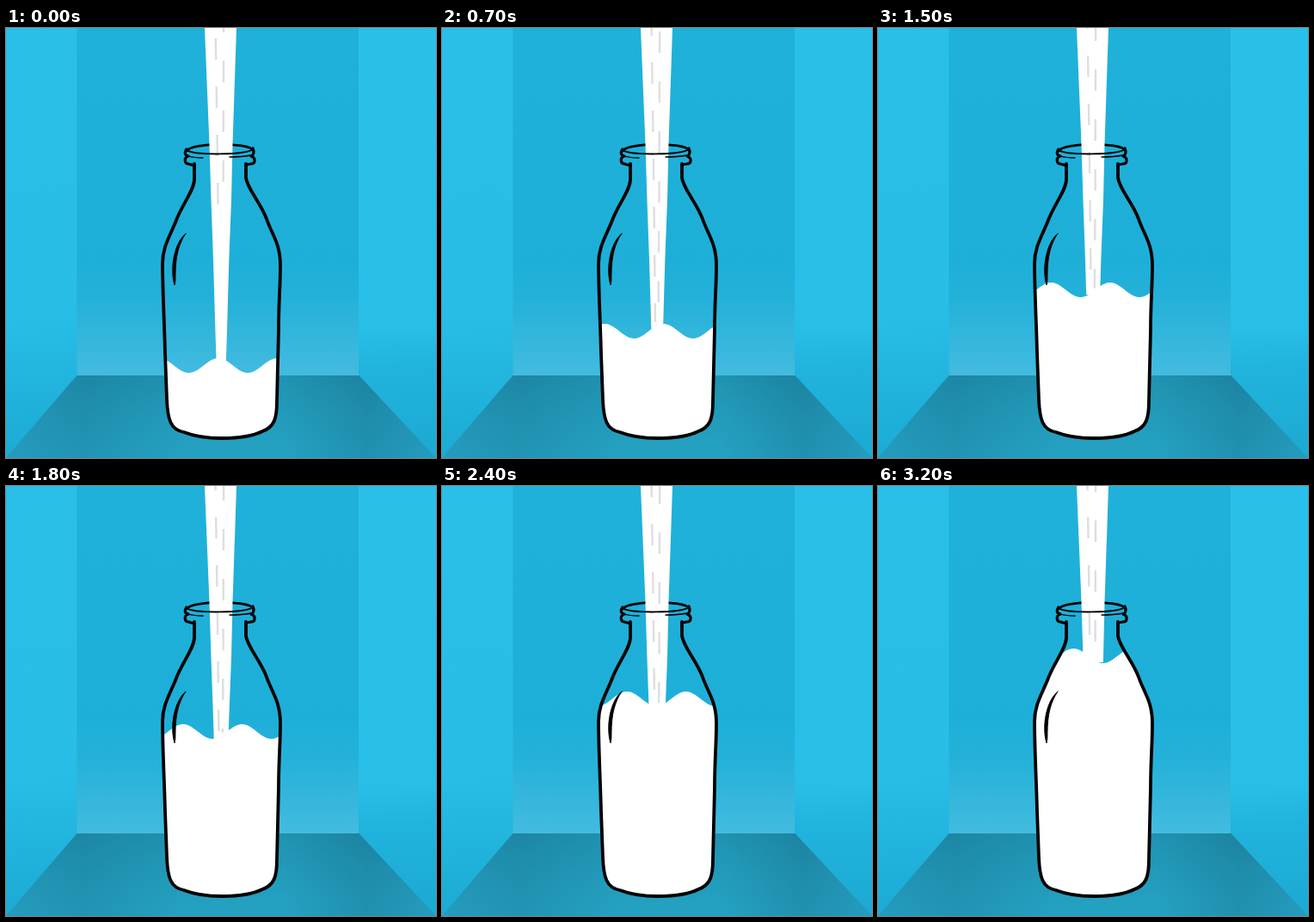
Write an HTML page with a canvas that moves like this. It is 500x500 px and loops after 3300 ms.

```html
<!DOCTYPE html>
<html>
<head>
<meta charset="utf-8">
<style>
html, body { margin: 0; width: 100%; height: 100%; overflow: hidden; background: #1fb1d9; }
canvas { display: block; width: 500px; height: 500px; }
</style>
</head>
<body>
<canvas id="stage" width="500" height="500"></canvas>
<script>
const ctx = document.getElementById('stage').getContext('2d');
const STEP = 100, STEPS = 33;

const BODY = new Path2D('M219 158 L219 176 C219 189 204 206 197 226 C190 243 182 255 182 274 ' +
  'C182 302 184 340 185 378 L187 432 C188 455 191 467 207 470 C222 476 237 477 251 477 ' +
  'C270 477 288 474 298 469 C312 464 315 454 315 434 L317 350 C317 320 319 300 319 276 ' +
  'C319 250 309 240 303 222 C296 203 280 186 279 174 L279 158');
const BACK_RIM = new Path2D('M210 143 C215 133 283 133 287 142');
const FRONT_RIM = new Path2D('M210 142 C218 148 278 148 287 141');
const LIP = new Path2D('M210 141 C207 145 208 148 212 149 C206 151 208 158 212 158 L219 160 ' +
  'M287 140 C289 144 288 148 285 149 C291 151 290 158 285 158 L279 159');
const LIP_LINES = new Path2D('M212 149 Q219 151 229 151 M285 148 Q274 150 260 150');
const SHINE = new Path2D('M209 239 C196 249 190 279 196 299 C197 296 197 292 197 288 C197 265 201 251 209 239 Z');

// Piecewise linear curve through [x, y] points
function curve(points, x) {
  let i = 1;
  while (i < points.length - 1 && x > points[i][0]) i++;
  const [x0, y0] = points[i - 1], [x1, y1] = points[i];
  return y0 + (y1 - y0) * (x - x0) / (x1 - x0);
}

const RISE = [[0, 0], [7, 40], [12, 69], [15, 88], [21, 126], [27, 164], [32, 195]];
const LEFT = [[0, 231], [135, 236.5], [200, 238.5], [270, 241], [345, 243.2], [400, 245]];
const RIGHT = [[0, 268], [135, 263.5], [200, 262], [270, 259.3], [345, 257.2], [400, 255.5]];

function gradient(x0, y0, x1, y1, stops) {
  const g = ctx.createLinearGradient(x0, y0, x1, y1);
  for (const [at, color] of stops) g.addColorStop(at, color);
  return g;
}

function polygon(points, fill) {
  ctx.beginPath();
  for (const [x, y] of points) ctx.lineTo(x, y);
  ctx.closePath();
  ctx.fillStyle = fill;
  ctx.fill();
}

function drawRoom() {
  polygon([[0, 0], [500, 0], [500, 410], [0, 410]],
    gradient(0, 0, 0, 404, [[0, '#1fb1d9'], [0.67, '#1eafd8'], [0.78, '#24b1d9'], [1, '#43bbdf']]));
  polygon([[0, 0], [82.5, 0], [82.5, 404], [0, 500]],
    gradient(0, 0, 25, 500, [[0, '#2abfe8'], [0.68, '#27bde6'], [1, '#1baad4']]));
  polygon([[410, 0], [500, 0], [500, 500], [410, 404]],
    gradient(440, 0, 465, 500, [[0, '#29bfe8'], [0.7, '#27bee7'], [0.78, '#21b4de'], [1, '#1ca9d3']]));
  const floor = [[82.5, 404], [410.5, 404], [500, 500], [0, 500]];
  polygon(floor, gradient(0, 0, 500, 0,
    [[0, '#2499bb'], [0.18, '#2090b0'], [0.42, '#249fbf'], [0.65, '#249fbf'], [0.84, '#1f8cab'], [1, '#2499bb']]));
  polygon(floor, gradient(0, 404, 0, 500, [[0, 'rgba(16,100,125,.22)'], [1, 'rgba(40,175,210,.14)']]));
}

function surface(x, n) {
  const crest = 246.8 + 1.53 * n;
  return 392.5 - curve(RISE, n) - 8.5 * Math.cos((x - crest) * Math.PI * 2 / 68.5);
}

function drawMilk(n) {
  ctx.save();
  ctx.clip(BODY);
  ctx.beginPath();
  ctx.moveTo(175, 485);
  for (let x = 175; x <= 325; x++) ctx.lineTo(x, surface(x, n));
  ctx.lineTo(325, 485);
  ctx.fillStyle = '#fff';
  ctx.fill();
  ctx.restore();
}

function drawStream(n) {
  const end = surface(250, n) + 6;
  const sides = [];
  for (let y = 0; y <= end; y += 5) {
    sides.unshift([curve(LEFT, y), y]);
    sides.push([curve(RIGHT, y), y]);
  }
  polygon(sides, '#fff');
  drawDashes(n, Math.min(end - 10, 206 + n * 20));
}

function drawDashes(n, end) {
  ctx.strokeStyle = '#dedede';
  ctx.lineWidth = 2.4;
  ctx.lineCap = 'butt';
  [[0.34, 56, 12], [0.6, 58, 38]].forEach(([share, gap, start]) => {
    const railX = y => curve(LEFT, y) * (1 - share) + curve(RIGHT, y) * share;
    for (let y = (start + n * 20) % gap - gap; y < end; y += gap) {
      const top = Math.max(0, y), low = Math.min(end, y + 25);
      if (low <= top) continue;
      ctx.beginPath();
      ctx.moveTo(railX(top), top);
      ctx.lineTo(railX(low), low);
      ctx.stroke();
    }
  });
}

function ink(path, width) {
  ctx.strokeStyle = '#000';
  ctx.lineWidth = width;
  ctx.lineCap = ctx.lineJoin = 'round';
  ctx.stroke(path);
}

function draw(n) {
  drawRoom();
  ink(BACK_RIM, 2.8);
  drawMilk(n);
  drawStream(n);
  ink(BODY, 3.8);
  ink(LIP, 3.2);
  ink(FRONT_RIM, 2);
  ink(LIP_LINES, 1.3);
  ctx.fillStyle = '#000';
  ctx.fill(SHINE);
  ink(SHINE, 0.8);
}

const begin = performance.now();
function tick() {
  draw(Math.floor((performance.now() - begin) / STEP) % STEPS);
  requestAnimationFrame(tick);
}
tick();
</script>
</body>
</html>
```
